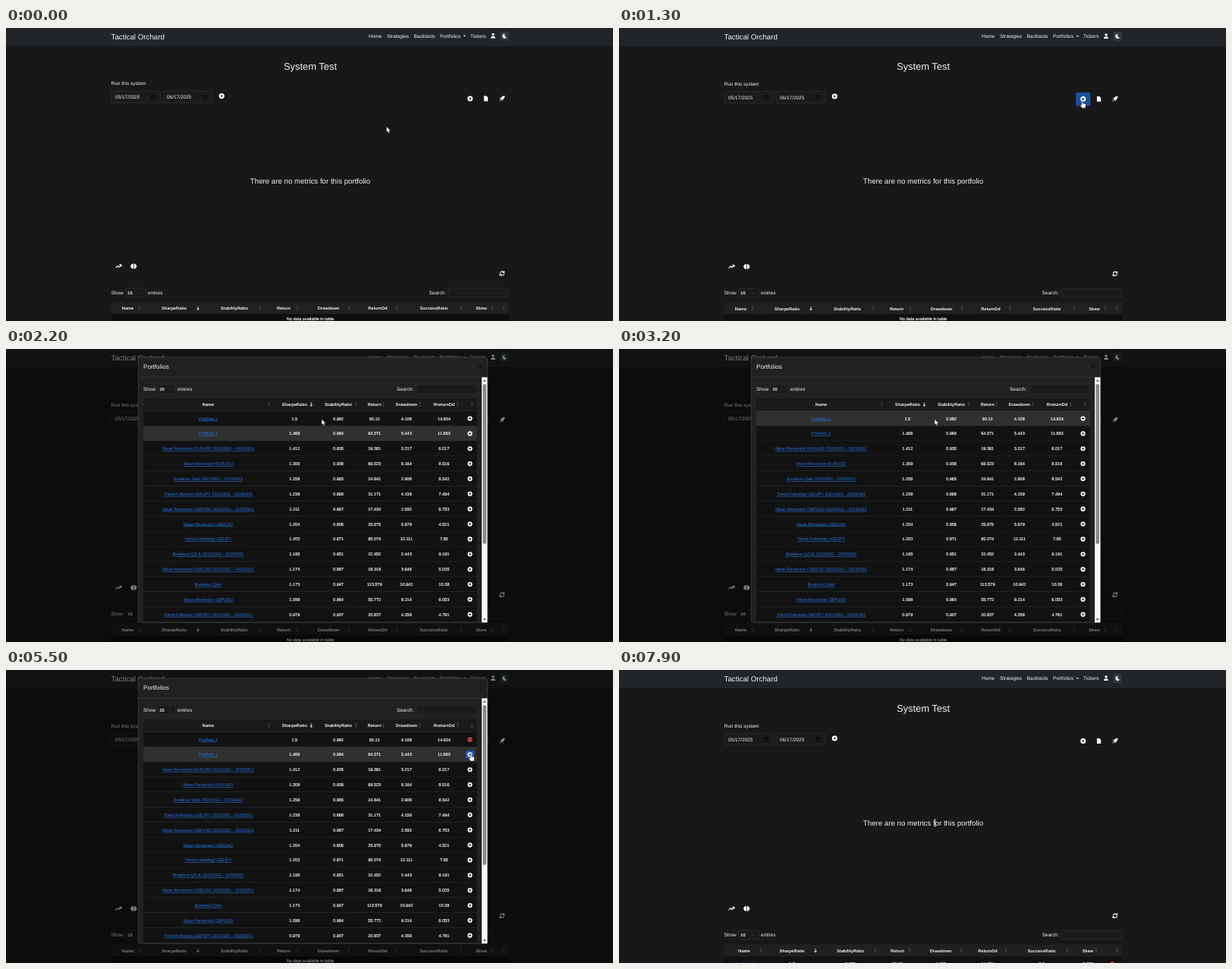
Recreate the animation shown at these times as an HTML page. Size 800x386 px, loop 8000 ms.

```html
<!DOCTYPE html>
<html lang="en">
<head>
<title>System Test</title>
<style>
  html, body { margin: 0; width: 100%; height: 100%; overflow: hidden; background: #181819; }
  svg { display: block; width: 100vw; height: 100vh; }
  text { font: 6.46px "Liberation Sans", Arial, sans-serif; fill: #f4f4f4; text-rendering: geometricPrecision; }
  .mid { text-anchor: middle; }
  .brand { font-size: 9.75px; }
  .h2 { font-size: 12.9px; }
  .h4 { font-size: 9.7px; }
  .h5 { font-size: 8.1px; }
  .th { font-size: 5.62px; font-weight: bold; }
  .td { font-size: 5.55px; stroke: #f4f4f4; stroke-width: .18px; }
  .link { font-size: 5.53px; fill: #2477e6; text-decoration: underline; }
  .pager { fill: #6c757d; }
  .field { fill: #1b1b1c; stroke: #333436; stroke-width: .6; }
  .ico { fill: #fff; }
  .line { fill: none; stroke: #fff; stroke-width: 1.1; stroke-linejoin: round; }
</style>
</head>
<body>
<svg id="stage" viewBox="0 0 800 386"></svg>
<script>
const LOOP = 8000, STEP = 100;
const ROW_TOP = 81.6, ROW_H = 19.86;
const DATES = " 20210301 - 20250301";

const text = (x, y, s, cls = "") => `<text x="${x}" y="${y}" class="${cls}">${s}</text>`;
const mid = (x, y, s, cls) => text(x, y, s, "mid " + cls);
const box = (x, y, w, h, fill, r = 0, more = "") =>
  `<rect x="${x}" y="${y}" width="${w}" height="${h}" rx="${r}" fill="${fill}" ${more}/>`;
const field = (x, y, w, h) => box(x, y, w, h, "#1b1b1c", 1.6, 'class="field"');
const path = (d, cls, x = 0, y = 0, more = "") =>
  `<path d="${d}" class="${cls}" transform="translate(${x} ${y})" ${more}/>`;
const group = (id, body) => `<g id="${id}">${body}</g>`;

const sortMark = (x, y, active) =>
  path("M-1.6-.8 0-3.2 1.6-.8Z", "", x, y, 'fill="#47494c"') +
  path(active ? "M-.4-2.4H.4V.4H2L0 3-2 .4H-.4Z" : "M-1.6.8 0 3.2 1.6.8Z", "", x, y,
    `fill="${active ? "#d8d8d8" : "#47494c"}"`);

const tableHead = (names, centers, marks, y) =>
  names.map((n, i) => mid(centers[i], y + 2, n, "th")).join("") +
  marks.map((x, i) => sortMark(x, y, i === 1)).join("");

const badge = (x, y, r, plus, fill = "#fff") =>
  `<circle cx="${x}" cy="${y}" r="${r}" fill="${fill}"/>` +
  path(plus ? "M-1.7 0H1.7M0-1.7V1.7" : "M-1.7 0H1.7", "", x, y, 'stroke="#181819" stroke-width=".9"');

const calendar = (x, y) =>
  path("M-2.4-2H2.4V2.6H-2.4ZM-2.4-.8H2.4M-1.2-3V-2M1.2-3V-2", "", x, y,
    'fill="none" stroke="#050505" stroke-width=".8"');

const chevron = (x, y) => path("M-1.5-.7 0 .8 1.5-.7", "", x, y, 'fill="none" stroke="#3d4043" stroke-width=".7"');

function navbar() {
  const links = [["Home", 478], ["Strategies", 502], ["Backtests", 537.5], ["Portfolios", 572], ["Tickers", 612]];
  return box(0, 0, 800, 24, "#212529") +
    text(138.5, 15, "Tactical Orchard", "brand") +
    links.map(([s, x]) => text(x, 13, s)).join("") +
    path("M-1.7-.8H1.7L0 1Z", "ico", 604.3, 11) +
    path("M0-3.4A1.7 1.7 0 0 1 0 0 1.7 1.7 0 0 1 0-3.4ZM-3 3.4C-3 1.2-1.6.6 0 .6S3 1.2 3 3.4Z", "ico", 642, 10.6) +
    box(651.5, 5, 11, 12, "#343a3f", 1.5) +
    path("M.6-3A3 3 0 1 0 3 1.5 3 3 0 0 1 .6-3Z", "ico", 656.8, 11);
}

function pageTables() {
  const names = ["Name", "SharpeRatio", "StabilityRatio", "Return", "Drawdown", "ReturnDd", "SuccessRatio", "Skew"];
  const before = [160.5, 221.5, 301, 366, 425, 490, 564, 626.5];
  const after = [165, 228, 305, 367, 424, 486, 557, 618];
  const cells = ["1.5", "0.982", "60.12", "4.108", "14.634", "0.6", "0.053"];
  return box(138.5, 361.5, 524.5, 15.8, "#1f2021") +
    group("empty",
      tableHead(names, before, [176, 253, 335, 384, 452, 515, 600, 641, 656], 369.5) +
      box(138.5, 377.3, 524.5, 12, "#0f0f10") +
      mid(401, 385.4, "No data available in table", "td") +
      text(138.5, 404.3, "Showing 0 to 0 of 0 entries") +
      box(603.5, 393, 59.5, 16, "#e9ecef", 1.5) +
      text(608.5, 403, "Previous", "pager") + text(644, 403, "Next", "pager")) +
    group("filled",
      tableHead(names, after, [187, 259, 338, 383, 451, 510, 591, 629, 656], 369.5) +
      box(138.5, 377.3, 524.5, 20, "#121213") +
      mid(165, 389, "Portfolio 2", "link") +
      cells.map((v, i) => mid(after[i + 1], 389, v, "td")).join("") +
      badge(650, 387.3, 3, false, "#d9434e"));
}

function page() {
  return navbar() +
    mid(401, 55.2, "System Test", "h2") +
    text(138.5, 75.6, "Run this system") +
    field(138.8, 83.5, 64.7, 15.6) + text(144, 93.8, "05/17/2025") + calendar(194, 91.3) +
    field(207, 83.5, 64.7, 15.6) + text(212, 93.8, "06/17/2025") + calendar(262.3, 91.3) +
    `<circle cx="284.2" cy="90" r="3.6" fill="#fff"/>` + path("M-1-1.7 1.7 0-1 1.7Z", "", 284.2, 90, 'fill="#181819"') +
    box(602.5, 85.2, 18.3, 17, "#1b4f9f", 1.5, 'id="addHover" stroke="#2a62b8" stroke-width=".5"') +
    badge(611.7, 93.5, 3.5, true) +
    path("M-2.6-3.5H.8L2.6-1.6V3.5H-2.6Z", "ico", 632.5, 93.5) +
    path("M3.6-3.6C1-3.6-.6-2.4-1.6-.8L-3.4-.4-3 0-1.9.3-.3 1.9 0 3 .4 3.4.8 1.6C2.4.6 3.6-1 3.6-3.6ZM-2.4 1.2-3.5 3.5-1.2 2.4Z",
      "ico", 653.8, 93.3) +
    mid(401, 205.2, "There are no metrics for this portfolio", "h4") +
    path("M-3.8 2-1.2-.6.6 1.2 3.4-1.8M1-2H3.6V.6", "line", 148.3, 314.3) +
    path("M-4-1.2H-3.2V-2.6H-1.9V-3.4H-.5V3.4H-1.9V2.6H-3.2V1.2H-4ZM4-1.2H3.2V-2.6H1.9V-3.4H.5V3.4H1.9V2.6H3.2V1.2H4ZM-1-.5H1V.5H-1Z",
      "ico", 168.2, 314.3) +
    path("M-2.7-.4A2.8 2.8 0 0 1 2.3-1.6M2.7.4A2.8 2.8 0 0 1-2.3 1.6M2.8-3.2V-1H.6M-2.8 3.2V1H-.6", "line", 653.8, 323.8) +
    text(138.5, 351.2, "Show") + field(157.3, 343, 27.7, 12) +
    text(160.3, 351.2, "10", "td") + chevron(176, 349.2) + text(187, 351.2, "entries") +
    text(557.5, 351.2, "Search:") + field(582.8, 343, 80, 12) +
    pageTables();
}

const ROWS = `Portfolio 2|1.5|0.982|60.12|4.108|14.634
Portfolio 1|1.466|0.984|64.571|5.443|11.863
Mean Reversion EURUSD${DATES}|1.412|0.935|19.361|3.217|6.017
Mean Reversion EURUSD|1.309|0.938|69.523|8.164|8.516
Breakout Qelo 20210301 - 20250613|1.256|0.965|24.841|2.908|8.542
Trend Following USDJPY${DATES}|1.238|0.868|31.171|4.159|7.494
Mean Reversion GBPUSD${DATES}|1.211|0.967|17.434|2.582|6.753
Mean Reversion USDCAD|1.204|0.806|25.675|5.679|4.521
Trend Following USDJPY|1.203|0.871|95.074|12.111|7.85
Breakout QZUL${DATES}|1.195|0.951|22.452|2.443|9.191
Mean Reversion USDCAD${DATES}|1.174|0.887|18.318|3.646|5.025
Breakout Qelo|1.173|0.947|113.579|10.942|10.38
Mean Reversion GBPUSD|1.098|0.964|55.772|9.214|6.053
Trend Following GBPJPY${DATES}|0.979|0.907|20.837|4.358|4.781`.split("\n").map(r => r.split("|"));

function modal() {
  const centers = [266.5, 380.3, 438, 485.7, 527.8, 577.3];
  const names = ["Name", "SharpeRatio", "StabilityRatio", "Return", "Drawdown", "RreturnDd"];
  const rows = ROWS.map((r, i) => {
    const top = ROW_TOP + i * ROW_H, y = top + ROW_H / 2;
    return box(181, top, 439.5, ROW_H, "#121213", 0, `id="row${i}"`) +
      box(181, top + ROW_H - .5, 439.5, .6, "#303133") +
      r.map((v, c) => mid(centers[c], y + 2, v, c ? "td" : "link")).join("") +
      (i < 2 ? box(606, y - 5.2, 11, 10.4, "none", 1.2, `id="btn${i}"`) : "") +
      group("plus" + i, badge(611.5, y, 3.1, true)) +
      (i < 2 ? group("minus" + i, badge(611.5, y, 3.1, false, "#d9434e")) : "");
  }).join("");
  return box(174.3, 11, 460.4, 349.6, "#212121", 3, 'stroke="#434446" stroke-width=".7"') +
    text(181, 26, "Portfolios", "h5") +
    path("M-2.6-2.6 2.6 2.6M2.6-2.6-2.6 2.6", "", 625, 24, 'stroke="#0a0a0a" stroke-width="1"') +
    box(174.5, 36.8, 460, .6, "#434446") +
    text(181, 55.2, "Show") + field(199.5, 46.8, 24, 12) + text(202.5, 55.1, "20", "td") +
    chevron(215.5, 53) + text(226, 55.2, "entries") +
    text(515, 55.2, "Search:") + field(540.5, 46.8, 79.8, 12) +
    box(181, 65, 439.5, 16.6, "#1a1a1b") +
    tableHead(names, centers, [346.3, 402.3, 461.3, 497.3, 545.3, 595.3, 614.3], 73) +
    box(181, 81, 439.5, .7, "#38393b") + rows +
    box(627, 37.3, 7.4, 323, "#fafafa") +
    box(628.3, 46, 4.8, 211, "#8b8b8b", 2.4) +
    path("M-2 1.4 0-1.6 2 1.4Z", "", 630.7, 41.6, 'fill="#666"') +
    path("M-2-1.4 0 1.6 2-1.4Z", "", 630.7, 356.3, 'fill="#666"');
}

const edge = 'stroke="#111" stroke-width=".45"';
const stage = document.getElementById("stage");
stage.innerHTML = group("page", page()) +
  box(0, 0, 800, 386, "#000", 0, 'id="shade"') +
  group("modal", modal()) +
  group("arrow", path("M0 0V7.6L1.8 6 3 8.8 4.3 8.2 3.1 5.5H5.4Z", "ico", 0, 0, edge)) +
  group("hand", path("M-.7.7A.7.7 0 0 1 .8.7V3.8L4 4.4Q4.9 4.7 4.8 5.7L4.2 9.9H-.3L-2.6 6.6Q-2.8 5.4-1.7 5.7L-.7 6.6Z",
    "ico", 0, 0, edge)) +
  group("beam", path("M-1.5-4.4H1.5M-1.5 4.4H1.5M0-4.4V4.4", "", 0, 0, 'stroke="#e4e4e4" stroke-width=".7"'));

const el = {};
stage.querySelectorAll("[id]").forEach(n => el[n.id] = n);
const show = (id, on) => el[id].setAttribute("visibility", on ? "inherit" : "hidden");
const move = (id, x, y) => el[id].setAttribute("transform", `translate(${x} ${y})`);
const ramp = (t, from, to) => Math.min(1, Math.max(0, (t - from) / (to - from)));
const smooth = p => p * p * (3 - 2 * p);

// time, x, y of the pointer tip
const POINTER = [
  [0, 501.5, 130], [200, 503, 130], [800, 629.5, 134], [950, 629.5, 132], [1250, 610.5, 95.5],
  [1600, 610.5, 95.5], [2100, 430, 108], [2200, 416, 92.5], [3500, 416, 92.5], [4200, 613, 91],
  [4950, 613, 91], [5400, 612.5, 110], [6700, 612.5, 111], [6800, 640.5, 129], [7050, 688, 140],
  [7350, 688, 140], [7800, 416.5, 201.5], [8000, 416.5, 201.5]
];

function pointerAt(t) {
  const i = Math.max(1, POINTER.findIndex(k => k[0] >= t));
  const a = POINTER[i - 1], b = POINTER[i], p = smooth(ramp(t, a[0], b[0]));
  return [a[1] + (b[1] - a[1]) * p, a[2] + (b[2] - a[2]) * p];
}

function draw(t) {
  const scroll = .4 + 21 * smooth(ramp(t, 350, 600)) - 21.4 * smooth(ramp(t, 950, 1200));
  move("page", 0, -scroll);

  const fade = ramp(t, 1450, 1600) - ramp(t, 7250, 7450);
  const slide = (1 - ramp(t, 1450, 1750)) ** 2 + ramp(t, 7250, 7550) ** 2;
  el.shade.setAttribute("opacity", .5 * fade);
  el.modal.setAttribute("opacity", fade);
  move("modal", 0, -20 * slide);

  // Row highlights trail the pointer by one step.
  const [x, y] = pointerAt(t);
  const [lagX, lagY] = pointerAt(Math.max(0, t - STEP));
  const open = fade > .9;
  const hovered = open && lagX > 181 && lagX < 620.5 ? Math.floor((lagY - ROW_TOP) / ROW_H) : -1;
  ROWS.forEach((r, i) => el["row" + i].setAttribute("fill", i === hovered ? "#303031" : "#121213"));

  const onRowButton = open && x > 606 && x < 618 && t > 3500;
  const onAdd = t >= 1200 && t < 1600;
  show("addHover", onAdd);

  [4900, 6750].forEach((added, i) => {
    const over = hovered === i && lagX > 606 && t > 3500;
    const done = t >= added;
    el["btn" + i].setAttribute("fill", !over ? "none" : !done ? "#1d55b5" : i ? "#8c3a86" : "#b02a37");
    show("plus" + i, !done || over);
    show("minus" + i, done && !over);
  });

  show("empty", t < 7600);
  show("filled", t >= 7600);

  const kind = onAdd || onRowButton ? "hand" : t >= 7800 ? "beam" : "arrow";
  ["arrow", "hand", "beam"].forEach(id => show(id, id === kind));
  move(kind, x, y);
}

const start = performance.now();
function tick() {
  const t = (performance.now() - start + 10) % LOOP;
  draw(Math.floor(t / STEP) * STEP);
  requestAnimationFrame(tick);
}
tick();
</script>
</body>
</html>
```
